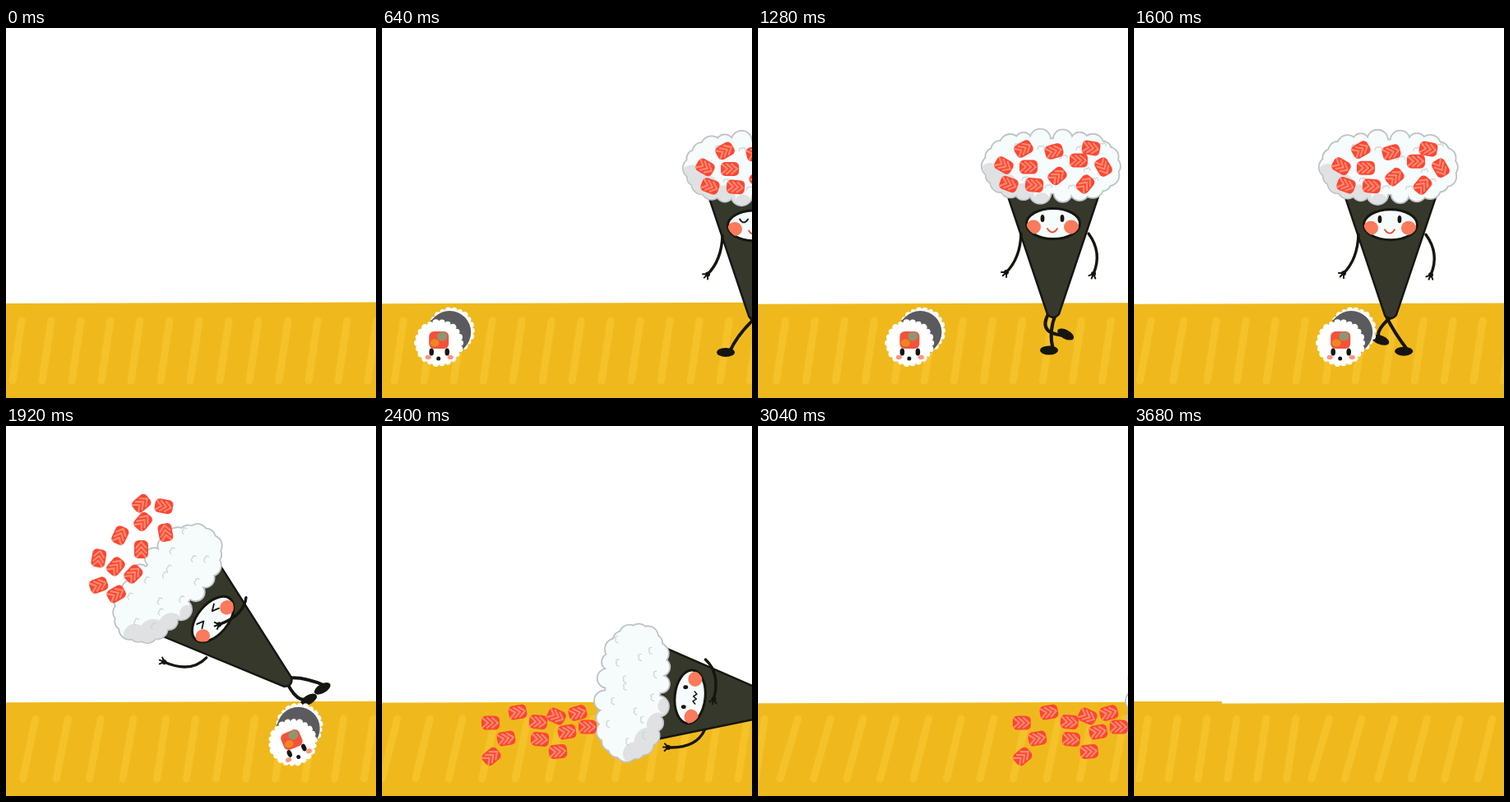
Write an HTML page with a canvas that moves like this. It is 450x450 px and loops after 3760 ms.

```html
<!DOCTYPE html>
<html>
<head>
<meta charset="utf-8">
<style>
  html, body { margin: 0; width: 100%; height: 100%; overflow: hidden; background: #fff; }
  canvas { display: block; }
</style>
</head>
<body>
<canvas id="stage" width="450" height="450"></canvas>
<script>
const c = document.getElementById('stage').getContext('2d');
const LOOP = 3760, STEP = 80, TRIP = 1600, AIR = 1920, LAND = 2200;
const INK = '#15160f', WHITE = '#f6fbfc';
const rad = d => d * Math.PI / 180;
const lerp = (a, b, p) => a + (b - a) * p;
const unit = (t, a, b) => Math.min(1, Math.max(0, (t - a) / (b - a)));

// Linear keyframes: each row is [time, ...values]
function keyed(t, rows) {
  let i = 1;
  while (i < rows.length - 1 && t > rows[i][0]) i++;
  const [a, b] = [rows[i - 1], rows[i]], p = unit(t, a[0], b[0]);
  return a.slice(1).map((v, k) => lerp(v, b[k + 1], p));
}

function at(x, y, deg, draw) {
  c.save();
  c.translate(x, y);
  c.rotate(rad(deg));
  draw();
  c.restore();
}

function oval(x, y, rx, ry, color, deg = 0) {
  c.beginPath();
  c.ellipse(x, y, rx, ry, rad(deg), 0, 7);
  c.fillStyle = color;
  c.fill();
}

function line(d, color, width) {
  c.strokeStyle = color;
  c.lineWidth = width;
  c.stroke(new Path2D(d));
}

// Ellipse with a bumpy rim; `box` below 1 squares it off
function bumpy(x, y, rx, ry, n, r, box = 1) {
  const p = new Path2D(), soft = v => Math.sign(v) * Math.abs(v) ** box;
  const rim = Array.from({ length: n }, (_, i) => {
    const a = i / n * 2 * Math.PI;
    return [x + rx * soft(Math.cos(a)), y + ry * soft(Math.sin(a))];
  });
  rim.forEach(([px, py], i) => i ? p.lineTo(px, py) : p.moveTo(px, py));
  p.closePath();
  rim.forEach(([px, py], i) => {
    const k = r * (1 + 0.12 * Math.sin(i * 2.4));
    p.moveTo(px + k, py);
    p.arc(px, py, k, 0, 7);
  });
  return p;
}

const riceShape = bumpy(-2, 0, 72, 33, 22, 11, 0.85);
const rollBack = bumpy(9, -8, 25, 25, 22, 3.6);
const rollFront = bumpy(-6, 7, 26, 25, 22, 3.8);

// Belt stripes: [offset, lean]
const stripes = [];
for (let k = -6; k < 14; k++) stripes.push([19 + 36 * k, 11]);
for (let k = 1; k < 13; k++) stripes.push([-197 - 39.7 * k, 12 + 0.8 * k]);
for (let k = 0; k < 8; k++) stripes.push([-714 - 36 * k, 11]);

// Salmon: x, y, angle on the rice, then x, y, angle on the belt at 2400 ms
const salmon = [
  [-36, -21, -30, 132, 361, 0], [1, -18, -15, 165, 348, -10], [46, -22, 10, 212, 353, 25],
  [-60, -1, 30, 133, 402, -40], [-30, 1, 0, 151, 380, -10], [31, -7, 0, 225, 372, -10],
  [61, 1, 60, 238, 349, -15], [-54, 22, 20, 192, 381, 5], [-23, 23, 5, 214, 396, -5],
  [5, 12, -40, 190, 360, 5], [39, 22, -50, 250, 366, 0]
];

const travel = t => 0.18 * Math.min(t, 1520) + 0.295 * Math.max(0, t - 1520);

function belt(s) {
  const top = x => 334.9 - 0.0032 * (x - s), seam = Math.max(0, s - 804);
  c.fillStyle = '#efb91d';
  c.beginPath();
  c.moveTo(0, 450);
  c.lineTo(0, seam ? 335 : top(0));
  c.lineTo(seam, seam ? 335 : top(0));
  c.lineTo(seam, top(seam));
  c.lineTo(450, top(450));
  c.lineTo(450, 450);
  c.fill();
  for (const [x, lean] of stripes) line(`M${x + s} 356L${x + s - lean} 429`, '#f6c22a', 9);
}

function roll(x, deg) {
  at(x, 376, deg, () => {
    c.fillStyle = '#fbfcf8';
    c.fill(rollBack);
    line('M-3 4L7 -6', '#5b5b5f', 52);
    c.fillStyle = '#fff';
    c.fill(rollFront);
    c.fillStyle = '#f4513b';
    c.beginPath();
    c.roundRect(-18, -7, 24, 21, 6);
    c.fill();
    oval(-2, -1, 6, 5.5, '#8d9673');
    oval(-11, 7, 5.5, 4.5, '#ee8720');
    for (const k of [-1, 1]) {
      oval(-5.5 + 9.5 * k, 18, 2.8, 4.6, INK);
      oval(-5.5 + 13.5 * k, 24.5, 3.6, 2.8, '#fb9384');
    }
    oval(-6.5, 26, 2.5, 2.5, INK);
  });
}

function piece(x, y, deg) {
  at(x, y, deg, () => {
    c.beginPath();
    c.roundRect(-11, -8.5, 22, 17, 5.5);
    c.fillStyle = '#fd4633';
    c.fill();
    c.clip();
    for (const k of [-6, 0, 6]) line(`M${k - 4} -6L${k + 3} 0L${k - 4} 6`, '#ff8a70', 2.2);
  });
}

function arm([x, y, mx, my, hx, hy]) {
  line(`M${x} ${y}Q${mx} ${my} ${hx} ${hy}`, INK, 3.4);
  const a = Math.atan2(hy - my, hx - mx);
  oval(hx, hy, 3, 3, INK);
  for (const k of [-0.8, 0, 0.8])
    line(`M${hx} ${hy}l${6 * Math.cos(a + k)} ${6 * Math.sin(a + k)}`, INK, 2);
}

function leg(hip, kneeX, kneeY, x, y, tilt) {
  line(`M${hip} 180Q${kneeX} ${kneeY} ${x} ${y}`, INK, 4);
  at(x, y, tilt, () => oval(-5, 1, 11, 5.5, INK));
}

function legs(t) {
  const phase = (t - 640) / 512 * 2 * Math.PI, q = unit(t, TRIP, AIR);
  [[0, 3, -17, 218, 5, 223], [Math.PI, -6, 14, 188, 26, 227]].forEach(([shift, hip, kx, ky, fx, fy]) => {
    const a = phase + shift, lift = Math.max(0, -Math.sin(a));
    const x = -30 * Math.cos(a) + 20 * lift, y = 223 - 17 * lift;
    leg(hip, lerp(x / 2 - 6 - 24 * lift, kx, q), lerp(202 + 4 * lift, ky, q),
      lerp(x, fx, q), lerp(y, fy, q), lerp(28 * lift, 20, q));
  });
}

function face(t) {
  c.save();
  c.beginPath();
  c.ellipse(0, 70, 32.5, 18.5, 0, 0, 7);
  c.fillStyle = WHITE;
  c.fill();
  c.lineWidth = 3;
  c.strokeStyle = INK;
  c.stroke();
  c.clip();
  oval(-24, 74, 9, 8.5, '#fa7a5b');
  oval(22, 74, 9, 8.5, '#fa7a5b');
  c.restore();
  const mood = t < 960 ? 'asleep' : t < 1640 || t >= LAND ? 'open' : 'hurt';
  for (const [x, k] of [[-13, 1], [11, -1]]) {
    if (mood === 'open') oval(x, 63.5, 2.4, t < LAND ? 4.6 : 3, INK);
    else if (mood === 'asleep') line(`M${x - 5} 62Q${x} 70 ${x + 5} 62`, INK, 1.8);
    else line(`M${x - 4 * k} 59L${x + 4 * k} 63L${x - 4 * k} 67`, INK, 1.8);
  }
  if (t < 1640) line('M-7 76Q-1 85 5 76', '#f0452f', 1.8);
  else if (mood === 'open') line('M-8 77l3 -3l3 4l3 -4l3 4l3 -3', INK, 1.5);
}

function rice() {
  c.save();
  c.strokeStyle = '#bfc2c5';
  c.lineWidth = 3.6;
  c.stroke(riceShape);
  c.fillStyle = WHITE;
  c.fill(riceShape);
  c.clip(riceShape);
  for (const [x, y, r] of [[-76, 10, 14], [-60, 26, 18], [-38, 36, 15], [-14, 42, 10]])
    oval(x, y, r, r, '#dfe1e3');
  c.restore();
  for (let i = 0; i < 14; i++) {
    const x = -62 + i * 9.4, y = 26 * Math.sin(i * 2.3);
    line(`M${x - 4} ${y + 2}q1 -5 4 -3q3 -3 4 2`, '#cfd4d7', 1.3);
  }
}

function pose(t) {
  if (t <= TRIP) {
    const a = (t - 640) / 512 * 4 * Math.PI;
    return [359 - 0.147 * (t - 1280), 168 + 1.2 * (1 + Math.cos(a)), 0];
  }
  if (t >= 2160) return [305 + 0.295 * (t - 2400), 322, -84];
  return keyed(t, [[TRIP, 312, 168, 0], [1760, 265, 172, -20], [AIR, 198, 190, -50],
    [2080, 204, 272, -72], [2160, 234, 322, -84]]);
}

function temaki(t, [x, y, deg]) {
  at(x, y, deg, () => {
    const tip = 183 + 9 * unit(t, TRIP, AIR);
    const cone = new Path2D(`M-56 34L-7 ${tip - 3}Q0 ${tip + 5} 7 ${tip - 3}L56 34Z`);
    legs(t);
    c.fillStyle = '#36382b';
    c.fill(cone);
    c.strokeStyle = INK;
    c.lineWidth = 2.4;
    c.stroke(cone);
    face(t);
    arm(keyed(t, [[TRIP, -39, 82, -40, 112, -57, 129], [AIR, -41, 94, -68, 92, -78, 58],
      [2160, -38, 92, -62, 84, -64, 50]]));
    arm(keyed(t, [[TRIP, 43, 82, 60, 105, 49, 131], [AIR, 46, 84, 28, 96, 0, 80],
      [2160, 47, 84, 32, 104, 0, 99]]));
    rice();
  });
}

function rotated(x, y, deg) {
  const a = rad(deg);
  return [x * Math.cos(a) - y * Math.sin(a), x * Math.sin(a) + y * Math.cos(a)];
}

function toppings(t, [px, py, deg]) {
  for (const [x, y, a, endX, endY, endA] of salmon) {
    const [rx, ry] = rotated(x, y, deg), [fx, fy] = rotated(x, y, -50);
    const airX = 152 + fx, airY = 146 + fy * 1.05;
    if (t <= AIR) {
      const q = unit(t, TRIP, AIR);
      piece(lerp(px + rx, airX, q), lerp(py + ry, airY, q) - 160 * q * (1 - q), a + deg);
    } else {
      const p = unit(t, AIR, LAND), ride = 0.295 * (Math.max(t, LAND) - 2400);
      piece(lerp(airX, endX + ride, p), lerp(airY, endY, (p + p * p) / 2), lerp(a - 50, endA, p));
    }
  }
}

function draw(now) {
  const step = Math.floor(now % LOOP / STEP) * STEP, t = step < 160 ? 0 : step;
  c.clearRect(0, 0, 450, 450);
  c.lineCap = c.lineJoin = 'round';
  const s = travel(t), p = pose(t);
  belt(s);
  if (t > 0) {
    temaki(t, p);
    roll(s - 40, -23 * unit(t, TRIP, AIR));
    toppings(t, p);
  }
  requestAnimationFrame(draw);
}
requestAnimationFrame(draw);
</script>
</body>
</html>
```
